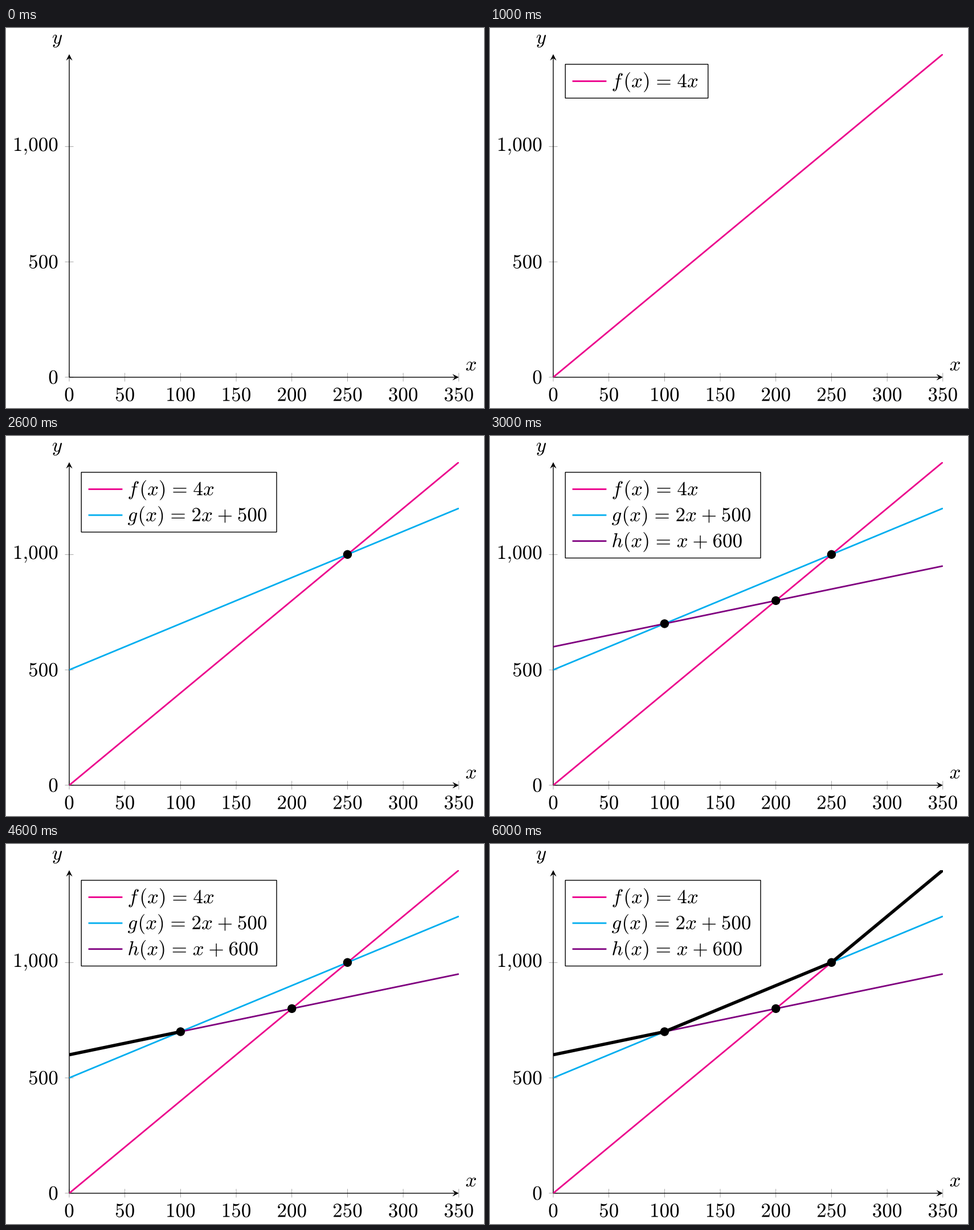
A matplotlib script for the animation above (7 s loop, 839 by 668 pixels).

```python
import matplotlib.pyplot as plt
from matplotlib.animation import FuncAnimation
from matplotlib.patches import Circle, PathPatch, Polygon, Rectangle
from matplotlib.textpath import TextPath
from matplotlib.transforms import Affine2D

W, H, DPI = 839, 668, 64
PT = 3.507                      # pixels per typographic point
EM = 10 * PT
X0, X1, Y0, Y1 = 111.0, 794.8, 54.1, 622.0
X_MAX, Y_MAX = 350, 1400
SEP = EM / 3                    # padding around labels
TICK = 7.5                      # half length of a tick
MAGENTA, CYAN, VIOLET = "#ec008c", "#00aeef", "#800080"

plt.rcParams.update({"mathtext.fontset": "cm", "path.snap": False})
fig = plt.figure(figsize=(W / DPI, H / DPI), dpi=DPI, facecolor="white")
ax = fig.add_axes([0, 0, 1, 1])
ax.set(xlim=(0, W), ylim=(0, H))
ax.axis("off")
area = Rectangle((X0, Y0), X1 - X0, Y1 - Y0, transform=ax.transData)
timed = []                      # pairs of (first step, artist)


def px(x):
    return X0 + (X1 - X0) * x / X_MAX


def py(y):
    return Y0 + (Y1 - Y0) * y / Y_MAX


def line(xs, ys, width, color="black", z=2):
    """Straight line in stage pixels, width in typographic points."""
    return ax.plot(xs, ys, color=color, lw=width * PT * 72 / DPI, zorder=z,
                   solid_capstyle="butt")[0]


def text(x, y, tex):
    path = TextPath((0, 0), f"${tex}$", size=EM)
    path = path.transformed(Affine2D().translate(x, y))
    return ax.add_patch(PathPatch(path, fc="black", lw=0, zorder=6))


def number(x, y, value, align):
    label = f"{value:,}"
    width = EM * sum(0.278 if c == "," else 0.5 for c in label)
    text(x - align * width, y, label.replace(",", "{,}"))


def arrow(tip, dx, dy):
    """Stealth arrow head pointing along (dx, dy)."""
    u = 0.4 * PT
    shape = [(0, 0), (-8, 4), (-5, 0), (-8, -4)]
    points = [(tip[0] + u * (a * dx - b * dy), tip[1] + u * (a * dy + b * dx))
              for a, b in shape]
    ax.add_patch(Polygon(points, fc="black", lw=0, zorder=2))


def draw_axes():
    digit = 0.644 * EM
    for v in range(0, X_MAX + 1, 50):
        line([px(v)] * 2, [Y0 - TICK, Y0 + TICK], 0.2, "gray", 1)
        number(px(v), Y0 - TICK - SEP - digit, v, 0.5)
    for v in range(0, Y_MAX, 500):
        line([X0 - TICK, X0 + TICK], [py(v)] * 2, 0.2, "gray", 1)
        depth = 0.194 * EM if v >= 1000 else 0
        number(X0 - TICK - SEP, py(v) - (digit - depth) / 2, v, 1)
    line([X0, X1 - 2 * PT], [Y0, Y0], 0.4)
    line([X0, X0], [Y0, Y1 - 2 * PT], 0.4)
    arrow((X1, Y0), 1, 0)
    arrow((X0, Y1), 0, 1)
    text(X1 + SEP, Y0 + SEP, "x")
    text(X0 - SEP - 0.526 * EM, Y1 + SEP + 0.194 * EM, "y")


def graph(step, slope, shift, start, end, width, color, z):
    curve = line([px(start), px(end)],
                 [py(slope * start + shift), py(slope * end + shift)],
                 width, color, z)
    curve.set_clip_path(area)
    timed.append((step, curve))


def dot(step, x, y):
    mark = Circle((px(x), py(y)), 2.2 * PT, fc="black", lw=0, zorder=5)
    timed.append((step, ax.add_patch(mark)))


draw_axes()

# slope, shift, colour, legend entry
EQ = r"\hspace{0.1164}=\hspace{0.1164}"
PLUS = r"\hspace{0.2531}{+}\hspace{0.2531}"
functions = [
    (4, 0, MAGENTA, r"f\hspace{0.1226}(x)" + EQ + "4x"),
    (2, 500, CYAN, r"g\hspace{0.0409}(x)" + EQ + "2x" + PLUS + "500"),
    (1, 600, VIOLET, "h(x)" + EQ + "x" + PLUS + "600"),
]
ROW, LEGEND_X, LEGEND_TOP = 13 * PT, 132.2, 604.3
for i, (slope, shift, color, tex) in enumerate(functions):
    step = i + 1
    graph(step, slope, shift, 0, X_MAX, 0.8, color, 3)
    base = LEGEND_TOP - 11.5 * PT - i * ROW
    sample = line([144.6, 204.4], [base + 0.3 * EM] * 2, 0.8, color, 6)
    timed += [(step, sample), (step, text(213.5, base, tex))]

dot(2, 250, 1000)
dot(3, 100, 700)
dot(3, 200, 800)

# upper envelope, one piece per step
graph(4, 1, 600, 0, 100, 1.6, "black", 4)
graph(5, 2, 500, 100, 250, 1.6, "black", 4)
graph(6, 4, 0, 250, X_MAX, 1.6, "black", 4)

legend = ax.add_patch(Rectangle((0, 0), 1, 1, fc="white", ec="black",
                                lw=0.4 * PT * 72 / DPI, zorder=5.5))
timed.append((1, legend))


def update(step):
    for first, artist in timed:
        artist.set_visible(step >= first)
    rows = min(max(step, 1), 3)
    height = rows * ROW + 4 * PT
    right = 382.7 if rows == 1 else 475.0
    legend.set_bounds(LEGEND_X, LEGEND_TOP - height, right - LEGEND_X, height)
    return [artist for _, artist in timed]


anim = FuncAnimation(fig, update, frames=7, interval=1000, repeat=True,
                     repeat_delay=0, blit=False)
plt.show()
```
